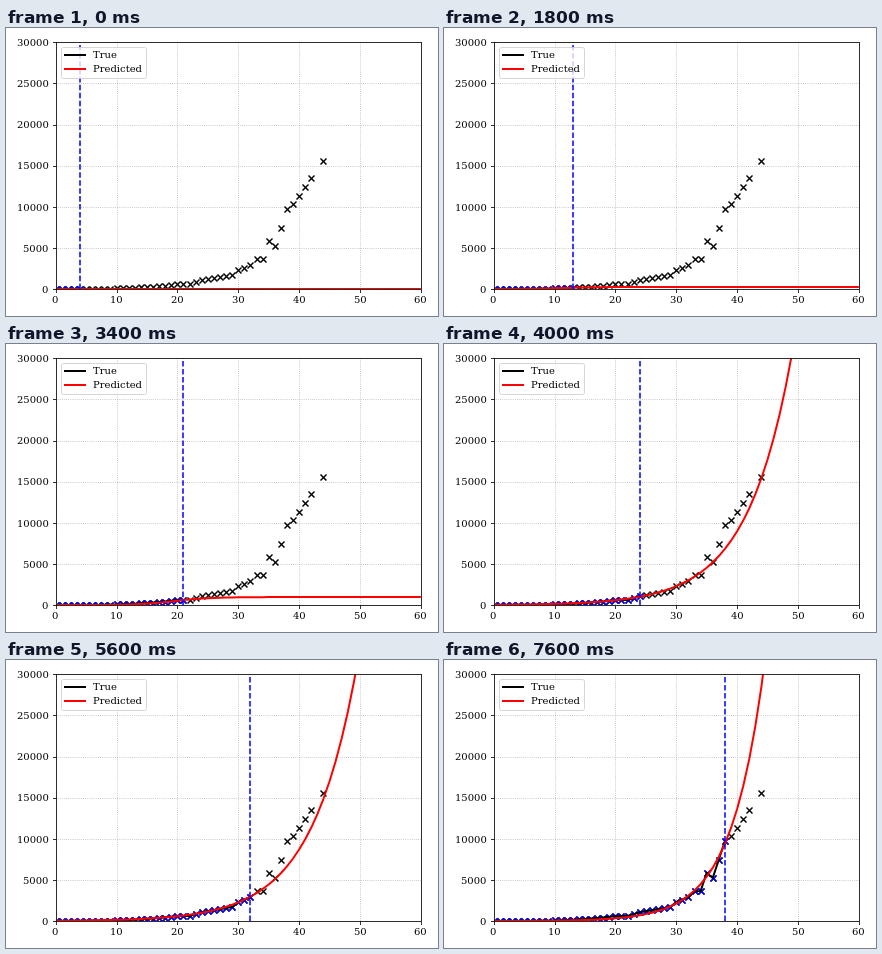
Write an HTML page with a canvas that moves like this. It is 432 px wide and 288 px high and loops after 8000 ms.

```html
<!DOCTYPE html>
<html lang="en">
<head>
<meta charset="utf-8">
<title>Forecast by day</title>
<style>
  html, body { margin: 0; width: 100%; height: 100%; overflow: hidden; background: #fff; }
  canvas { display: block; }
</style>
</head>
<body>
<canvas id="chart" width="432" height="288"></canvas>
<script>
const ctx = document.getElementById('chart').getContext('2d');
const LOOP = 8000, FIRST_DAY = 4, LAST_OBSERVED = 44, MISSING_DAY = 43;
const MAX_DAY = 60, MAX_VALUE = 30000;
const LEFT = 49.65, RIGHT = 414.85, TOP = 14.25, BOTTOM = 261.1;

// Turning points of the observed values: [day, value].
const observedKeys = [[20, 600], [22, 620], [24, 1080], [29, 1700], [30, 2330],
  [32, 2920], [33, 3640], [34, 3650], [35, 5880], [36, 5250], [38, 9720],
  [39, 10300], [42, 13500], [44, 15550]];

// Exponential fits: [day, growth rate, day on which MAX_VALUE is reached].
const fitKeys = [[9, .39, 24.8], [12, .27, 30.9], [24, .136, 48.88], [32, .134, 49.24],
  [34, .132, 50.4], [35, .17, 45.45], [36, .155, 46.9], [38, .185, 44.27]];

const xOf = day => LEFT + day * (RIGHT - LEFT) / MAX_DAY;
const yOf = value => BOTTOM - value * (BOTTOM - TOP) / MAX_VALUE;
const snap = v => Math.round(v) + .5;
const range = (end, step = 1) => Array.from({ length: end / step + 1 }, (_, i) => i * step);

// Linear interpolation between rows of [day, ...values].
function interpolate(keys, day) {
  const next = Math.max(1, keys.findIndex(key => key[0] >= day));
  const a = keys[next - 1], b = keys[next];
  const part = Math.max(0, (day - a[0]) / (b[0] - a[0]));
  return a.slice(1).map((v, i) => v + (b[i + 1] - v) * part);
}

const observed = day => day < 20 ? .075 * day ** 3 : interpolate(observedKeys, day)[0];

// While growth stalls, the fit levels off above the latest value.
const levelsOff = day => day < 7 || day > 12 && day < 23 || day > 26 && day < 30;

function fitFor(day) {
  if (levelsOff(day)) {
    const rate = .33, limit = 1.6 * observed(day);
    const middle = day + Math.log(.6) / rate;
    return d => limit / (1 + Math.exp(-rate * (d - middle)));
  }
  const [rate, topDay] = interpolate(fitKeys, day);
  return d => MAX_VALUE * Math.exp(rate * (d - topDay));
}

function stroke(points, color, width, dash = []) {
  ctx.strokeStyle = color;
  ctx.lineWidth = width;
  ctx.setLineDash(dash);
  ctx.beginPath();
  points.forEach(([x, y]) => ctx.lineTo(x, y));
  ctx.stroke();
}

function cross(day, color) {
  const x = snap(xOf(day)), y = snap(yOf(observed(day)));
  stroke([[x - 3, y - 3], [x + 3, y + 3]], color, 1.5);
  stroke([[x - 3, y + 3], [x + 3, y - 3]], color, 1.5);
}

// The align factor is the share of the text width left of x.
function label(text, x, y, align = 0) {
  ctx.fillStyle = '#000';
  ctx.fillText(text, Math.round(x - align * ctx.measureText(text).width), Math.round(y));
}

const dayTicks = range(MAX_DAY, 10), valueTicks = range(MAX_VALUE, 5000);

function drawGrid() {
  const dots = [.8, 1.32];
  for (const x of dayTicks.map(d => snap(xOf(d)))) stroke([[x, BOTTOM], [x, TOP]], '#b0b0b0', .8, dots);
  for (const y of valueTicks.map(v => snap(yOf(v)))) stroke([[LEFT, y], [RIGHT, y]], '#b0b0b0', .8, dots);
}

function drawAxes() {
  const left = snap(LEFT), right = snap(RIGHT), top = snap(TOP), bottom = snap(BOTTOM);
  for (const day of dayTicks) {
    const x = snap(xOf(day));
    stroke([[x, bottom], [x, bottom + 3.5]], '#000', .8);
    label(day, xOf(day), 275, .5);
  }
  for (const value of valueTicks) {
    const y = snap(yOf(value));
    stroke([[left, y], [left - 3.5, y]], '#000', .8);
    label(value, LEFT - 7, yOf(value) + 3.7, 1);
  }
  ctx.strokeRect(left, top, right - left, bottom - top);
}

function drawLegend() {
  ctx.beginPath();
  ctx.roundRect(55.5, 19.5, 85, 31, 2);
  ctx.fillStyle = 'rgba(255,255,255,.8)';
  ctx.fill();
  ctx.strokeStyle = 'rgba(204,204,204,.8)';
  ctx.lineWidth = 1;
  ctx.setLineDash([]);
  ctx.stroke();
  [['True', '#000', 27], ['Predicted', '#f00', 41]].forEach(([name, color, y]) => {
    stroke([[58, y], [80, y]], color, 2);
    label(name, 87, y + 3);
  });
}

function draw(today) {
  ctx.fillStyle = '#fff';
  ctx.fillRect(0, 0, 432, 288);
  ctx.font = '10px "DejaVu Serif", serif';
  ctx.lineJoin = 'round';
  drawGrid();

  ctx.save();
  ctx.beginPath();
  ctx.rect(50, 14, 365, 247);
  ctx.clip();
  range(LAST_OBSERVED).filter(d => d !== MISSING_DAY).forEach(d => cross(d, '#000'));
  range(today).forEach(d => cross(d, '#00f'));
  stroke(range(today).map(d => [xOf(d), yOf(observed(d))]), '#000', 2);
  const fit = fitFor(today);
  stroke(range(MAX_DAY).map(d => [xOf(d), Math.max(-1e4, yOf(fit(d)))]), '#f00', 2);
  const x = Math.round(xOf(today));
  stroke([[x, BOTTOM], [x, TOP]], '#00f', 1.5, [5.55, 2.4]);
  ctx.restore();

  ctx.lineJoin = 'miter';
  drawAxes();
  drawLegend();
}

// The last days are shown twice as long.
const dayAt = t => t < 6000 ? FIRST_DAY + Math.floor(t / 200) : 34 + Math.floor((t - 6000) / 400);

function tick() {
  draw(dayAt(performance.now() % LOOP));
  requestAnimationFrame(tick);
}
tick();
</script>
</body>
</html>
```
